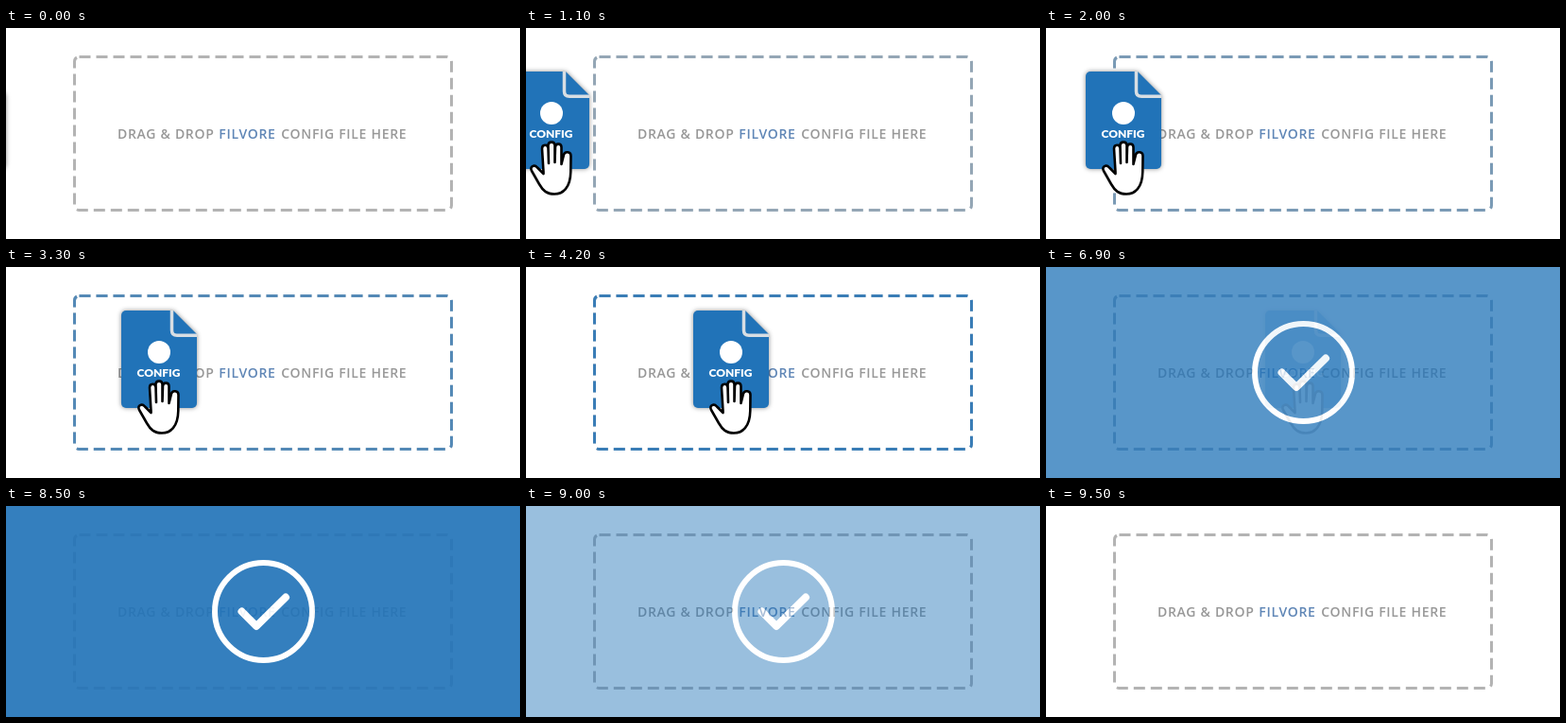
An HTML page with a canvas for the animation above (9600 ms loop, 544 px wide and 223 px high).

```html
<!DOCTYPE html>
<html lang="en">
<head>
<meta charset="utf-8">
<title>Drop zone</title>
<style>
html, body { margin: 0; width: 100%; height: 100%; overflow: hidden; background: #fff; }
canvas { display: block; }
</style>
</head>
<body>
<canvas id="stage" width="544" height="223"></canvas>
<script>
const W = 544, H = 223, LOOP = 9600, STEP = 100;
const BLUE = '#2173b8', GRAY = '#b3b3b3';
const PAD = 10, CARD_W = 80, TOP = 46, BOTTOM = 149;
const ctx = document.getElementById('stage').getContext('2d');

const handPath = new Path2D(
  'M31.5 152 L30 127.5 C30 122.5 36 122.5 36.5 127 L37 143 L36.5 124 ' +
  'C36.5 119.5 43.5 119.5 43.5 124 L43.5 142 L44 126 C44 121.5 50.5 121.5 50.5 126 ' +
  'L50.5 144 L53 134 C54 130 60.5 130.5 60.5 135 L60.3 152 ' +
  'C60 169 52 175.5 43 175.5 C35 175.5 31 172 27 165 L19 151 ' +
  'C16.5 146 22 144 25 147.5 L31.5 154 Z');

const clamp = v => Math.min(1, Math.max(0, v));
const ramp = (t, from, to) => clamp((t - from) / (to - from));

// Off-screen layer, so that a group of shapes can fade as one picture.
function makeLayer(w) {
  const c = document.createElement('canvas');
  c.width = w;
  c.height = H;
  return c.getContext('2d');
}
const cardLayer = makeLayer(CARD_W + 2 * PAD);
const doneLayer = makeLayer(W);

function stamp(layer, x, alpha) {
  if (alpha <= 0) return;
  ctx.globalAlpha = alpha;
  ctx.drawImage(layer.canvas, x, 0);
  ctx.globalAlpha = 1;
}

function drawBorder(color, alpha) {
  if (alpha <= 0) return;
  ctx.save();
  ctx.globalAlpha = alpha;
  ctx.strokeStyle = color;
  ctx.lineWidth = 3;
  ctx.setLineDash([12, 6]);
  ctx.beginPath();
  ctx.roundRect(72.5, 30.5, 399, 162, 5);
  ctx.stroke();
  ctx.restore();
}

function drawLabel() {
  ctx.font = '600 14px "Open Sans", sans-serif';
  ctx.letterSpacing = '0.7px';
  const put = (text, x, color) => {
    ctx.fillStyle = color;
    ctx.fillText(text, x, 117);
  };
  put('DRAG & DROP', 118, '#989898');
  put('FILVORE', 225.3, '#5f86b6');
  put('CONFIG FILE HERE', 291.2, '#989898');
}

function drawCard(g) {
  g.clearRect(0, 0, g.canvas.width, H);
  g.save();
  g.translate(PAD, 0);

  // Sheet with the top right corner cut off
  g.save();
  g.shadowColor = 'rgba(0,0,0,.45)';
  g.shadowBlur = 5;
  g.fillStyle = BLUE;
  g.beginPath();
  g.moveTo(5, TOP);
  g.lineTo(55, TOP);
  g.lineTo(CARD_W, 71);
  g.arcTo(CARD_W, BOTTOM, 0, BOTTOM, 5);
  g.arcTo(0, BOTTOM, 0, TOP, 5);
  g.arcTo(0, TOP, 55, TOP, 5);
  g.fill();
  g.restore();

  // Fold
  g.strokeStyle = '#d8dee3';
  g.lineWidth = 3.5;
  g.beginPath();
  g.moveTo(53.5, TOP);
  g.lineTo(53.5, 67);
  g.quadraticCurveTo(53.5, 72.3, 59, 72.3);
  g.lineTo(CARD_W, 72.3);
  g.stroke();

  // Emblem
  g.fillStyle = '#fff';
  g.beginPath();
  g.arc(40, 90, 12, 0, Math.PI * 2);
  g.fill();

  g.font = '900 12px Lato, sans-serif';
  g.textAlign = 'center';
  g.fillText('CONFIG', 39.5, 116);

  g.lineWidth = 2.6;
  g.lineJoin = 'round';
  g.strokeStyle = '#000';
  g.fill(handPath);
  g.stroke(handPath);
  g.restore();
}

function drawDone(g) {
  g.fillStyle = BLUE;
  g.fillRect(0, 0, W, H);
  g.strokeStyle = '#fff';
  g.lineCap = g.lineJoin = 'round';
  g.lineWidth = 6;
  g.beginPath();
  g.arc(272.5, 111.5, 51.5, 0, Math.PI * 2);
  g.stroke();
  g.lineWidth = 8;
  g.beginPath();
  g.moveTo(249.5, 111.5);
  g.lineTo(265, 127);
  g.lineTo(296, 96.5);
  g.stroke();
}

function render(time) {
  const t = Math.floor((time % LOOP) / STEP) * STEP;
  const drag = ramp(t, 0, 5100);
  const reveal = ramp(t, 5700, 7300);
  const hide = ramp(t, 8400, 9500);

  ctx.fillStyle = '#fff';
  ctx.fillRect(0, 0, W, H);
  drawBorder(GRAY, 1);
  drawBorder(BLUE, drag * (1 - reveal));
  drawLabel();

  if (reveal < 1) {
    drawCard(cardLayer);
    stamp(cardLayer, Math.round(312 * drag) - CARD_W - PAD, 1 - reveal);
  }
  stamp(doneLayer, 0, reveal * (1 - hide));
}

drawDone(doneLayer);
const start = performance.now();
function tick() {
  render(performance.now() - start);
  requestAnimationFrame(tick);
}
tick();
</script>
</body>
</html>
```
